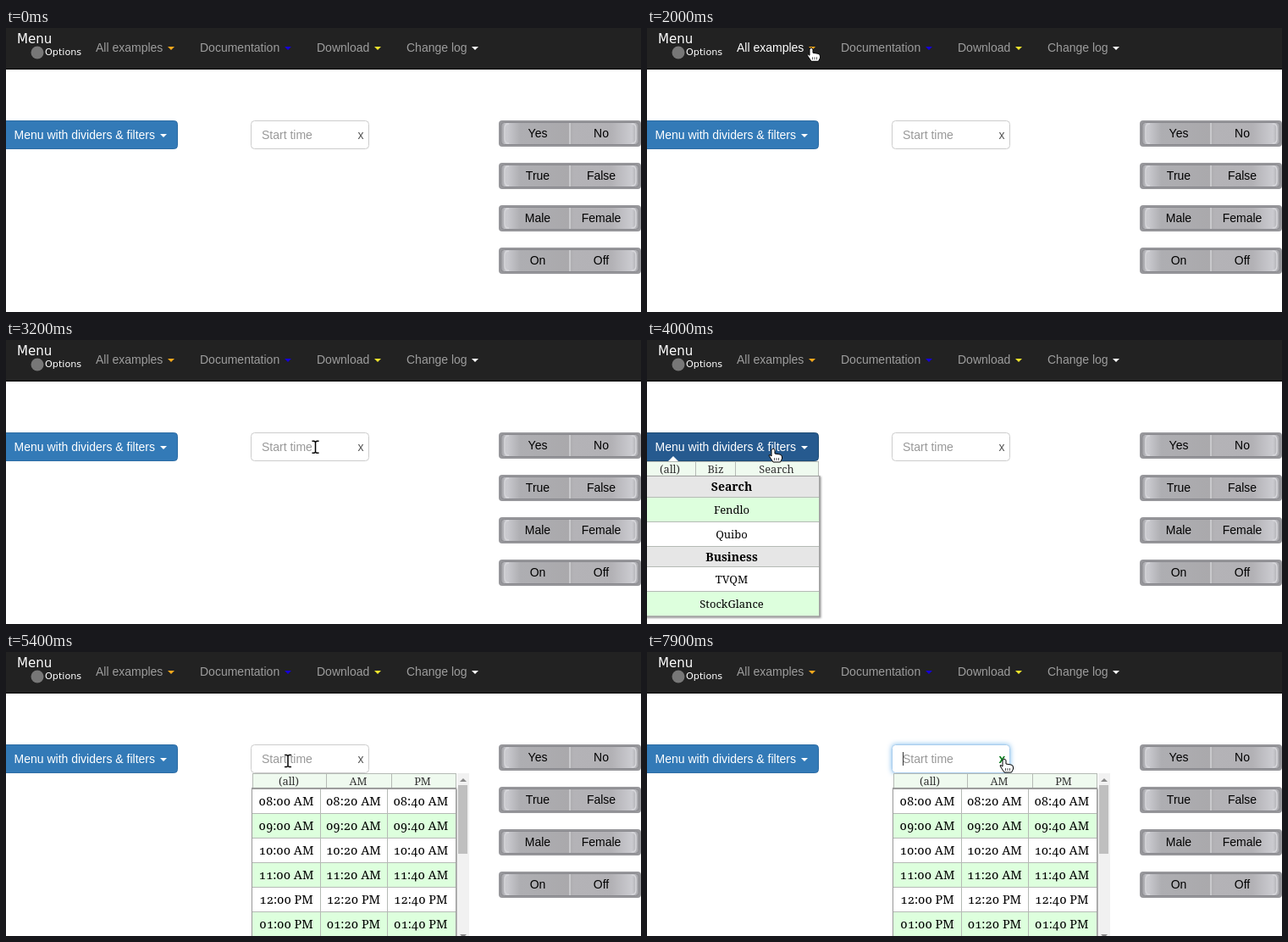
Animation of 750x335 px, one loop 8 s. Source, as an HTML page:

```html
<!DOCTYPE html>
<html lang="en">
<head>
<meta charset="utf-8">
<title>Menu demo</title>
<style>
  html, body { margin: 0; width: 100%; height: 100%; overflow: hidden; background: #fff; }
  svg { display: block; width: 750px; height: 335px; }
  text { font: 14px "Liberation Sans", Arial, sans-serif; white-space: pre; }
  .mid { text-anchor: middle; }
  .menu text { font: 13px "Noto Serif", Georgia, serif; text-anchor: middle; }
  .menu text.head { font-weight: bold; font-size: 14px; }
  .menu text.time { font-size: 14.4px; font-variant-numeric: oldstyle-nums; }
  .menu text.filter { font-size: 12.8px; fill: #333; }
  .logo text { font-family: "DejaVu Sans", sans-serif; fill: #fff; }
  .link { fill: #9d9d9d; }
  .link.on { fill: #fff; }
  .shadow { filter: drop-shadow(1px 1px 1px #0006); }
</style>
</head>
<body>
<svg id="stage" viewBox="0 0 750 335">
  <defs>
    <linearGradient id="metal">
      <stop offset="0" stop-color="#9b9b9f"/>
      <stop offset=".04" stop-color="#cbcbd0"/>
      <stop offset=".14" stop-color="#aeaeb2"/>
      <stop offset=".49" stop-color="#aaa9ac"/>
      <stop offset=".53" stop-color="#b4b3b7"/>
      <stop offset=".8" stop-color="#b2b1b5"/>
      <stop offset=".95" stop-color="#cbcbd0"/>
      <stop offset="1" stop-color="#a0a0a4"/>
    </linearGradient>
  </defs>
</svg>
<script>
(() => {
const LOOP = 8000, STEP = 100;
const stage = document.getElementById('stage');

const rect = (x, y, w, h, fill, more = '') =>
  `<rect x="${x}" y="${y}" width="${w}" height="${h}" fill="${fill}" ${more}/>`;
const text = (x, y, str, cls = '', more = '') =>
  `<text x="${x}" y="${y}" class="${cls}" ${more}>${str}</text>`;
const path = (d, fill, more = '') => `<path d="${d}" fill="${fill}" ${more}/>`;
const caret = (x, y, fill) => path(`M${x} ${y}h8l-4 4z`, fill);
const line = (d, color = '#b5bab5') => path(d, 'none', `stroke="${color}"`);

function group(markup, cls = '') {
  const g = document.createElementNS('http://www.w3.org/2000/svg', 'g');
  g.setAttribute('class', cls);
  g.innerHTML = markup;
  stage.append(g);
  return g;
}
const show = (el, on) => { el.style.display = on ? '' : 'none'; };

// Navigation bar
group(rect(0, 0, 750, 48, '#222') + rect(0, 48, 750, 1, '#080808'));
group(text(13, 18, 'Menu', '', 'style="font-size:15px"') +
  '<circle cx="37" cy="29" r="7.5" fill="#777"/>' +
  text(46, 32, 'Options', '', 'style="font-size:11.2px"'), 'logo');

const links = [
  ['All examples', 106, 191, '#f5a81c'],
  ['Documentation', 229, 329, '#1500d8'],
  ['Download', 367, 435, '#eee32c'],
  ['Change log', 473, 550, '#fff']
].map(([label, x, end, color]) => ({
  x, end: end + 8,
  el: group(text(x, 28, label) + caret(end, 22, color), 'link')
}));

// Toggle switches
[['Yes', 'No'], ['True', 'False'], ['Male', 'Female'], ['On', 'Off']].forEach(([a, b], i) => {
  const y = 109 + 50 * i;
  group(rect(582, y, 168, 31, '#97979b', 'rx="4"') +
    rect(584.5, y + 2.5, 163, 26, 'url(#metal)', 'rx="4" stroke="#88888d"') +
    path(`M594 ${y + 4}q-5 0-5 5v13q0 5 5 5M739 ${y + 4}q5 0 5 5v13q0 5-5 5`, 'none',
      'stroke="#d6d6da" stroke-width="1.5"') +
    rect(665, y + 3, 2, 25, '#c9c9cc') +
    text(628, y + 20, a, 'mid') + text(703, y + 20, b, 'mid'));
});

// Menu button
const button = group(rect(-5.5, 109.5, 208, 33, '#337ab7', 'rx="4" stroke="#2e6da4"') +
  text(9.5, 131, 'Menu with dividers &amp; filters', '', 'fill="#fff"') + caret(182, 125, '#fff'));
const face = button.firstChild;

// Time field
const glow = group(rect(289.5, 109.5, 139, 33, '#fff',
  'rx="4" style="filter:drop-shadow(0 0 3px #66afe9)"'));
const field = group(rect(289.5, 109.5, 139, 33, '#fff', 'rx="4" stroke="#ccc"') +
  text(302, 131, 'Start time') + text(415.5, 131, 'x'));
const [box, value, clear] = field.children;
const bar = group(rect(302, 118, 1, 16, '#333'));

// Download menu
const download = group(path('M380 49l8-7 8 7z', '#fff') +
  rect(352, 49, 100, 87, '#fff', 'class="shadow" stroke="#a2a2a2" stroke-width="2"') +
  rect(353, 78, 98, 28, '#dfd') + line('M353 77.5h98M353 106.5h98') +
  ['quorby', 'npm', 'brightpond'].map((s, i) => text(402, 68 + 29 * i, s)).join(''), 'menu');

// Filter tabs: edges of the cells and their labels
const tabs = (edges, labels, centers) => {
  const left = edges[0], right = edges[edges.length - 1];
  return rect(left, 143, right - left, 17, '#effaef') +
    line(`M${left} 143.5H${right}` + edges.map(x => `M${x + .5} 143v17`).join('')) +
    labels.map((s, i) => text(centers[i], 157, s, 'filter')).join('');
};

// Menu with dividers
let rowY = 161;
const entries = [
  ['Search', 25, '#e6e6e6', 'head'], ['Fendlo', 29, '#dfd'], ['Quibo', 29, '#fff'],
  ['Business', 24, '#e6e6e6', 'head'], ['TVQM', 29, '#fff'], ['StockGlance', 29, '#dfd']
].map(([label, h, fill, cls = '']) => {
  const y = rowY;
  rowY += h;
  return rect(-2, y, 205, h, fill) + line(`M0 ${y + h - .5}h203`) +
    text(100, y + (cls ? 17 : 19), label, cls);
}).join('');
const dividers = group(path('M25 143l6-6 6 6z', '#fff') +
  tabs([-2, 57, 104, 202], ['(all)', 'Biz', 'Search'], [27, 81, 153]) +
  rect(-4, 161, 207.5, 165, '#fff', 'class="shadow" stroke="#a2a2a2" stroke-width="2"') +
  entries, 'menu');

// Time menu
const pad = n => String(n).padStart(2, '0');
function timeTable(x, rows, filtered) {
  const w = filtered ? 239 : 240, h = rows * 29;
  let cells = '';
  for (let r = 0; r < rows; r++) {
    const y = 162 + 29 * r, hour = 8 + r;
    cells += rect(x, y, w, 29, r % 2 ? '#dfd' : '#fff') + line(`M${x} ${y + 28.5}h${w}`);
    for (let c = 0; c < 3; c++) {
      const half = hour < 12 ? 'AM' : 'PM';
      const mark = filtered ? `<tspan fill="#a01a28">${half}</tspan>` : half;
      cells += text(x + 40 + 79.4 * c, y + 19,
        `${pad((hour - 1) % 12 + 1)}:${pad(20 * c)} ${mark}`, 'time');
    }
  }
  return tabs([x, x + 87, x + 164, x + w], ['(all)', 'AM', 'PM'], [x + 43, x + 125, x + 201]) +
    rect(x, 161, w, h + 1, '#fff', 'class="shadow" stroke="#9c9c9c" stroke-width="2"') +
    cells + line(`M${x + 80.5} 162v${h}M${x + 159.5} 162v${h}`);
}
const fullTimes = group(timeTable(291, 6, false) + rect(533, 143, 14, 192, '#f1f1f1') +
  path('M536 153h8l-4-4zM536 333h8l-4 4z', '#8a8a8a') + rect(534, 157, 11, 81, '#bfbfbf'), 'menu');
const amTimes = group(timeTable(289, 4, true), 'menu');
const hover = group(rect(370, 191, 78, 28, '#d8dcd8') +
  text(408.4, 210, '09:20 AM', 'time', 'fill="#9c2340"'), 'menu');

// Pointers
const ink = 'stroke="#000" stroke-linejoin="round"';
const beam = 'M-4-6.5h2.5L0-5.5 1.5-6.5H4M0-5.5v12M-4 7.5h2.5L0 6.5 1.5 7.5H4';
const pointers = {
  hand: group(path('M-2 1.5Q0-1.5 2 1.5V6l6 1q2.5.5 2.5 3v2l-2 4H0l-4-6q-2-3 0-2.5l2 1.5z', '#fff', ink) +
    path('M1.5 11v3M4 11v3M6.5 11v3', 'none', 'stroke="#555"')),
  arrow: group(path('M0 0v14l3.3-3 2.2 5 2.5-1-2.2-5h4.5z', '#fff', ink)),
  beam: group(path(beam, 'none', 'stroke="#fff" stroke-width="3.5"') +
    path(beam, 'none', 'stroke="#000" stroke-width="1.5"'))
};

// Time, x, y of the pointer tip
const route = [
  [1500, 57, 36], [1600, 57, 36], [1900, 150, 24], [2150, 275, 22], [2400, 438, 18],
  [2500, 438, 18], [2900, 405, 90], [3100, 398, 125], [3500, 190, 130], [4000, 149, 128],
  [4400, 149, 128], [4800, 230, 128], [5300, 333, 128], [5500, 333, 128], [6000, 414, 152],
  [6200, 414, 152], [6600, 392, 212], [6900, 392, 212], [7100, 424, 128], [7200, 424, 128],
  [7300, 422, 126], [8000, 422, 126]
];

function pointerAt(t) {
  const i = route.findIndex(p => p[0] > t);
  const [t0, x0, y0] = route[i - 1], [t1, x1, y1] = route[i];
  const u = (t - t0) / (t1 - t0), k = u * u * (3 - 2 * u);
  return [x0 + (x1 - x0) * k, y0 + (y1 - y0) * k];
}

function draw(t) {
  const within = (a, b) => t >= a && t < b;
  const seen = t >= 1500;
  const [x, y] = seen ? pointerAt(t) : [-99, -99];
  const inside = (l, tp, r, b) => x >= l && x < r && y >= tp && y < b;

  links.forEach(l => l.el.classList.toggle('on', inside(l.x, 0, l.end, 48)));

  const onButton = inside(0, 109, 203, 143);
  face.setAttribute('fill', onButton ? '#265a8f' : '#337ab7');
  face.setAttribute('stroke', onButton ? '#204d74' : '#2e6da4');

  const focused = t >= 7700, chosen = within(6900, 7700), onClear = t >= 7300;
  show(glow, focused);
  show(bar, focused);
  box.setAttribute('stroke', focused ? '#a9cdec' : '#ccc');
  value.textContent = chosen ? '09:20 AM' : 'Start time';
  value.setAttribute('fill', chosen ? '#555' : '#999');
  clear.setAttribute('fill', onClear ? '#0a7a1c' : '#555');
  clear.style.fontWeight = onClear ? 'bold' : '';

  const onDownload = within(2300, 3200), onDividers = within(3500, 4700);
  const full = within(5300, 6200) || focused, filtered = within(6200, 6900);
  show(download, onDownload);
  show(dividers, onDividers);
  show(fullTimes, full);
  show(amTimes, filtered);
  show(hover, filtered && inside(370, 191, 448, 219));

  const active = y < 56 || onButton || onClear || inside(414, 109, 429, 143) ||
    onDownload && inside(351, 48, 453, 137) || (full || filtered) && y > 143;
  const kind = active ? 'hand' : inside(289, 109, 414, 143) ? 'beam' : 'arrow';
  for (const name in pointers) {
    show(pointers[name], seen && name === kind);
    pointers[name].setAttribute('transform', `translate(${x} ${y})`);
  }
}

function tick() {
  const t = performance.now() % LOOP;
  draw(Math.floor(t / STEP) * STEP);
  requestAnimationFrame(tick);
}
tick();
})();
</script>
</body>
</html>
```
